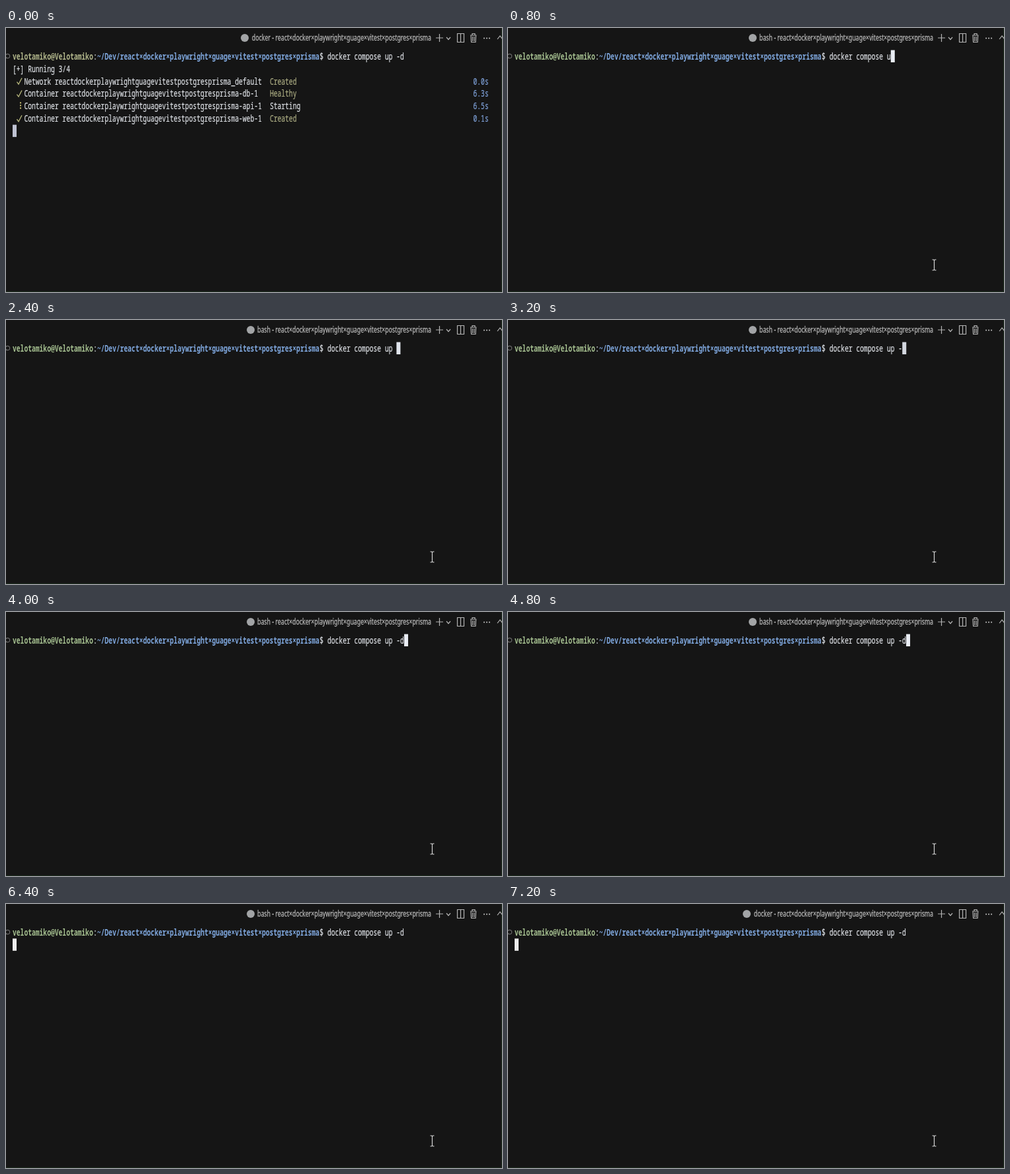
Animation, 750 px wide and 400 px high, one loop 8000 ms. Source, as an HTML page:

```html
<!DOCTYPE html>
<html lang="en">
<head>
<meta charset="utf-8">
<title>Terminal</title>
<style>
  html, body { margin: 0; width: 100%; height: 100%; overflow: hidden; background: #151515; }
  svg { display: block; width: 100vw; height: 100vh; }
  text { white-space: pre; font-variant-ligatures: none; }
  .mono { font: 14px "Noto Sans Mono", "DejaVu Sans Mono", monospace; }
  .title { font: 12.7px "Noto Sans", "Open Sans", sans-serif; fill: #b8b8b8; stroke: #b8b8b8; stroke-width: .3; }
  .icon { fill: none; stroke: #b4b4b4; stroke-width: 1.2; }
  .user { fill: #a3bd8e; font-weight: 600; }
  .path { fill: #7ea6dc; font-weight: 600; }
  .plain { fill: #dcdfe4; stroke: #dcdfe4; stroke-width: .25; }
  .ok { fill: #a9aa80; stroke: #a9aa80; stroke-width: .25; }
  .time { fill: #7d9fd6; stroke: #7d9fd6; stroke-width: .25; }
  .late .user { fill: #b0b58a; }
</style>
</head>
<body>
<svg viewBox="0 0 750 400" preserveAspectRatio="none">
  <rect width="750" height="400" fill="#151515"/>
  <path d="M749.500 0v399.500H0" fill="none" stroke="#1b2a1c"/>
  <circle id="badge" cy="15" r="6" fill="#a2a4a6"/>
  <g class="icon">
    <path d="M650 15h11M655.500 9v12M666 14l3 3.500 3-3.500"/>
    <path d="M682.500 8.500h10v13h-10zM687.500 8.500v13"/>
    <path d="M702 11h9.500M705 11V8.500h4V11"/>
    <path d="M703 11.500l.6 10h6.400l.6-10M705.500 13v7M708 13v7"/>
    <path d="M743 17l4-5 4 5"/>
    <circle cx="2.500" cy="42.500" r="3.200" stroke="#686868"/>
  </g>
  <g fill="#b8b8b8">
    <circle cx="723" cy="15.500" r="1.100"/><circle cx="727" cy="15.500" r="1.100"/><circle cx="731" cy="15.500" r="1.100"/>
  </g>
  <g id="term"></g>
  <rect id="caret" width="6" height="18.500"/>
  <path id="mouse" d="M641.500 351h2l1 1 1-1h2M644.500 352v14M641.500 367h2l1-1 1 1h2" fill="none" stroke="#d4d4d4" stroke-width="1.200"/>
</svg>
<script>
const NS = 'http://www.w3.org/2000/svg';
const SQUEEZE = 0.691, CELL = 8.4 * SQUEEZE, LEFT = 10, ROW = 18.85, TOP = 43;
const LOOP = 8000;
const parts = ['react', 'docker', 'playwright', 'guage', 'vitest', 'postgres', 'prisma'];
const folder = parts.join('×'), project = parts.join('');
const command = 'docker compose up -d';
const $ = id => document.getElementById(id);
const term = $('term');

function add(parent, tag, attrs, text = '') {
  const el = document.createElementNS(NS, tag);
  for (const key in attrs) el.setAttribute(key, attrs[key]);
  el.textContent = text;
  return parent.appendChild(el);
}

// All text shares the same narrow aspect.
function label(parent, x, y, cls, text, anchor = 'start') {
  return add(parent, 'text', {
    transform: `translate(${x} ${y}) scale(${SQUEEZE} 1)`, class: cls, 'text-anchor': anchor
  }, text);
}

const colX = col => LEFT + col * CELL;
const rowY = row => TOP + row * ROW;
const put = (parent, col, row, cls, text) =>
  label(parent, colX(col), rowY(row) + 4.8, 'mono ' + cls, text);

const title = label(term, 643, 19, 'title', '', 'end');
put(term, 0, 0, 'user', 'velotamiko@Velotamiko');
put(term, 21, 0, 'plain', ':');
put(term, 22, 0, 'path', '~/Dev/' + folder);
put(term, 80, 0, 'plain', '$');
const input = put(term, 82, 0, 'plain', '');

const output = add(term, 'g', {});
put(output, 0, 1, 'plain', '[+] Running 3/4');
[
  ['Network', '_default', 'Created', '0.0s'],
  ['Container', '-db-1', 'Healthy', '6.3s'],
  ['Container', '-api-1', 'Starting', '6.5s'],
  ['Container', '-web-1', 'Created', '0.1s']
].forEach(([kind, suffix, state, time], i) => {
  const row = i + 2, y = rowY(row), busy = state === 'Starting';
  put(output, 3, row, 'plain', `${kind} ${project}${suffix}`);
  put(output, 67, row, busy ? 'plain' : 'ok', state);
  put(output, 120, row, 'time', time);
  if (busy) {
    for (const dy of [-4, 0, 4])
      add(output, 'circle', { cx: 22, cy: y - 1 + dy, r: 1.1, fill: '#d2c777' });
  } else {
    add(output, 'path', {
      d: `M16.500 ${y + 1}l2.500 3.500 5-9.500`, fill: 'none', stroke: '#b9b97e', 'stroke-width': 1.3
    });
  }
});

// [start ms, program, typed characters, caret row, caret colour]
const steps = [
  [0, 'docker', 20, 6, '#bfc3d2'],
  [800, 'bash', 16, 0, '#e9edf4'],
  [1600, 'bash', 17, 0, '#e9edf4'],
  [2400, 'bash', 18, 0, '#e0e4ec'],
  [3200, 'bash', 19, 0, '#d4d8e0'],
  [4000, 'bash', 20, 0, '#e9edf4'],
  [5600, 'bash', 20, 1, '#ececec'],
  [7200, 'docker', 20, 1, '#ececec']
];
let shown = null;

function draw(now) {
  const t = now % LOOP;
  const step = steps.findLast(s => s[0] <= t);
  if (step === shown) return;
  shown = step;
  const [, program, typed, row, color] = step;
  const done = row === 6;
  title.textContent = `${program} - ${folder}`;
  $('badge').setAttribute('cx', program === 'bash' ? 370 : 361);
  input.textContent = command.slice(0, typed);
  $('caret').setAttribute('x', colX(row ? 0 : 82 + typed));
  $('caret').setAttribute('y', rowY(row) - 9.5);
  $('caret').setAttribute('fill', color);
  output.style.display = done ? '' : 'none';
  $('mouse').style.display = done ? 'none' : '';
  term.setAttribute('class', done ? 'late' : '');
}

const start = performance.now();
function tick() {
  draw(performance.now() - start);
  requestAnimationFrame(tick);
}
draw(0);
requestAnimationFrame(tick);
</script>
</body>
</html>
```
